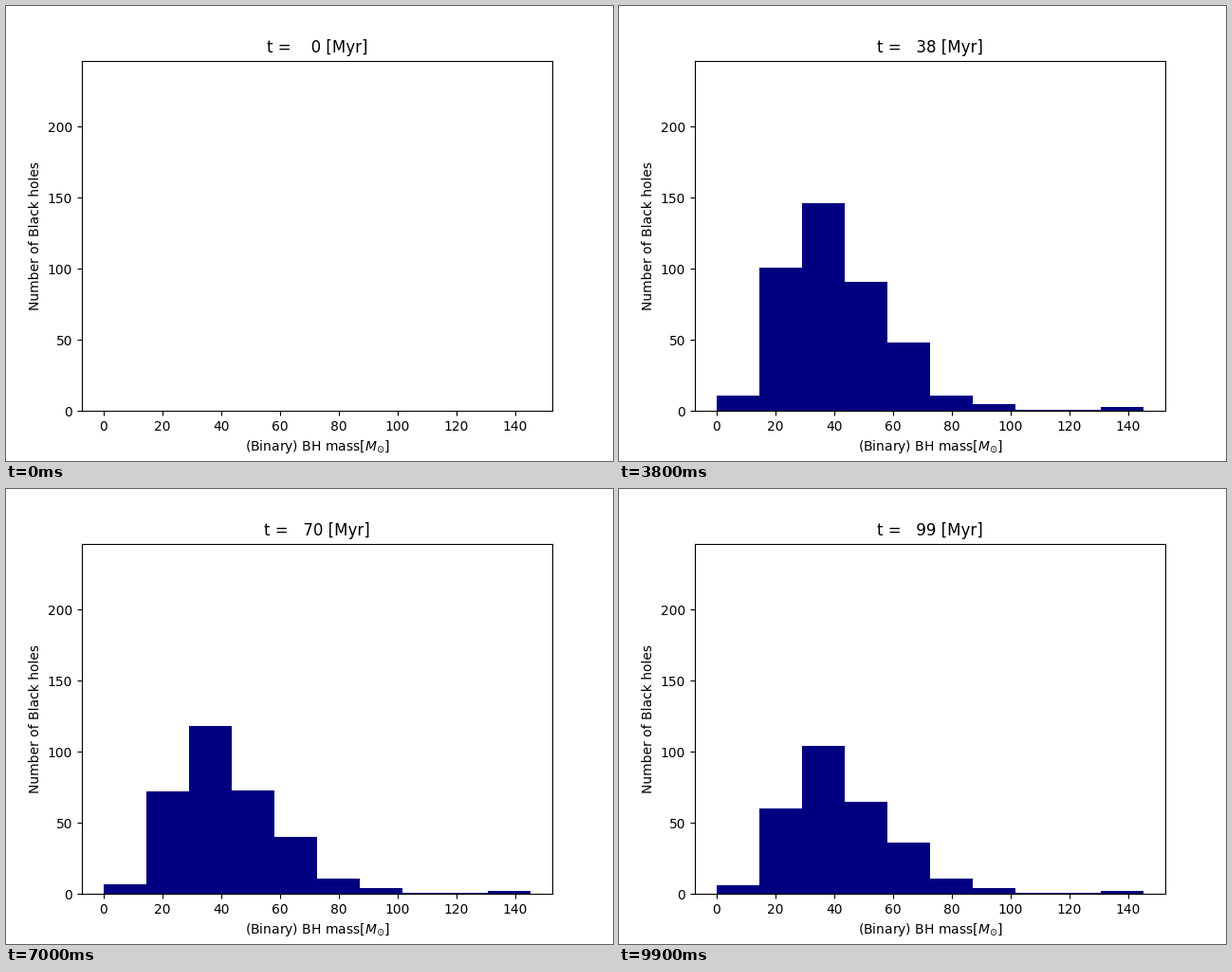
Animation, 640 px wide and 480 px high, one loop 10 s. Source, as a matplotlib script:

```python
import numpy as np
import matplotlib.pyplot as plt
from matplotlib.animation import FuncAnimation

FRAMES, INTERVAL = 100, 100
MASS_MAX, COUNT_MAX = 145.3, 246.4
T_BIRTH, T_REF = 3, 12  # first black holes, reference age [Myr]


def population(amp, decay, rise, floor=0):
    """Count over time: formation on a rise scale, then power-law loss."""
    def count(t):
        age = max(t - T_BIRTH, 0)
        formed = 1 - np.exp(-(age / rise) ** 2)
        lost = (max(t, T_BIRTH) / T_REF) ** -decay
        return round(formed * (floor + amp * lost))
    return count


# One population per mass bin, light to heavy
populations = [
    population(62.4, 2, 5, floor=5),
    population(187.5, 0.54, 4.5),
    population(218, 0.35, 4),
    population(135.7, 0.35, 7.47),
    population(65.9, 0.28, 8.58),
    population(11.4, 0, 5),
    population(5.6, 0.15, 5),
    population(1, 0, 16.8),
    population(1, 0, 26.4),
    population(5, 0.52, 12),
]

fig, ax = plt.subplots(figsize=(6.4, 4.8), dpi=100)
bins = len(populations)
width = MASS_MAX / bins
bars = ax.bar(np.arange(bins) * width, np.zeros(bins), width,
              align="edge", color="navy")
ax.set_xlim(-0.05 * MASS_MAX, 1.05 * MASS_MAX)
ax.set_ylim(0, COUNT_MAX)
ax.set_xlabel(r"(Binary) BH mass[$M_{\odot}$]")
ax.set_ylabel("Number of Black holes")
title = ax.set_title("")


def update(t):
    for bar, count in zip(bars, populations):
        bar.set_height(count(t))
    title.set_text(f"t = {t:4d} [Myr]")
    return [*bars, title]


anim = FuncAnimation(fig, update, frames=FRAMES, interval=INTERVAL,
                     repeat=True, repeat_delay=0, blit=False)
plt.show()
```
